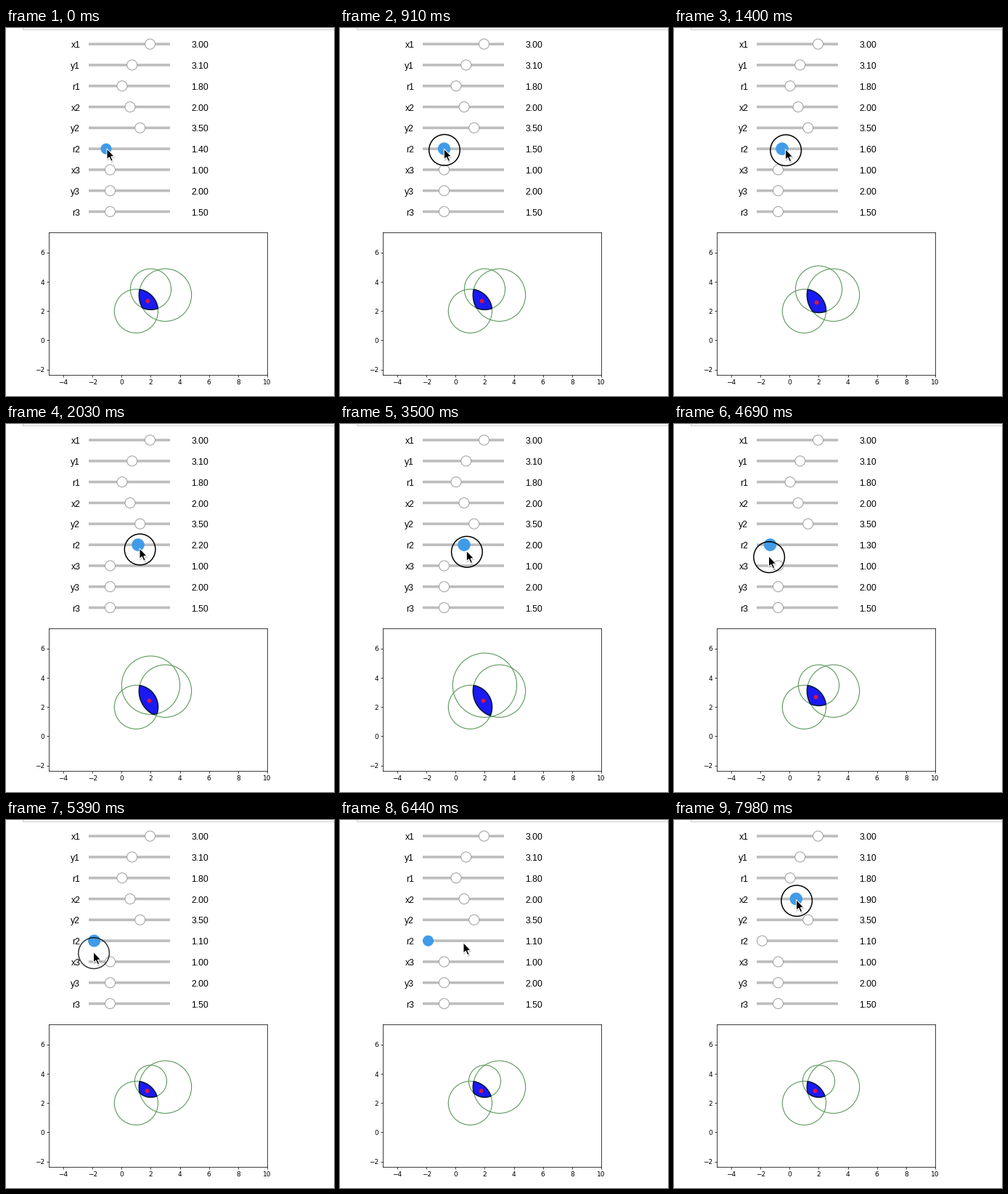
Recreate the animation shown at these times as a matplotlib script. Size 452 by 506 pixels, loop 8 s.

```python
import numpy as np
import matplotlib.pyplot as plt
from matplotlib.animation import FuncAnimation
from matplotlib.patches import Circle, Polygon

W, H, DPI = 452, 506, 64
PX = 72 / DPI                      # points per pixel
FRAMES, INTERVAL, STEP = 200, 40, 70
BLUE, GREY, RIM = "#409be8", "#bdbdbd", "#9e9e9e"

# discs as x, y, r
DISCS = np.array([(3, 3.1, 1.8), (2, 3.5, 1.4), (1, 2, 1.5)])
LOW, SPAN = dict(x=0, y=1, r=1), dict(x=4, y=4, r=2)
KNOB_X0, KNOB_TRAVEL = 116, 110

# pointer moves: start, end, target x, target y
HOME = (139, 166)
MOVES = [(700, 1400, 153.5, 166.5), (1400, 2040, 184.5, 171),
         (3080, 3400, 174.3, 174.2), (3500, 4690, 130.5, 181.5),
         (4690, 5000, 120.5, 181.5), (5880, 6230, 170, 168.5),
         (6440, 7000, 169, 130), (7140, 7420, 173, 109.5),
         (7600, 7980, 168.5, 109.5)]
RELEASE, GRAB = 5320, 7490         # r2 let go, x2 taken
ARROW = np.array([(0, 0), (0, 14.6), (3.3, 11.6), (5.8, 17.2), (8.2, 16.2),
                  (5.8, 10.8), (10.2, 10.6)])


def pointer(t):
    p = np.array(HOME, float)
    for start, end, x, y in MOVES:
        p += ((x, y) - p) * np.clip((t - start) / (end - start), 0, 1)
    return p


def knob_x(kind, value):
    return KNOB_X0 + KNOB_TRAVEL * (value - LOW[kind]) / SPAN[kind]


def dragged(kind, t):
    """Value under the pointer, in steps of 0.1."""
    part = (pointer(t)[0] - 1 - KNOB_X0) / KNOB_TRAVEL
    return round(LOW[kind] + SPAN[kind] * part, 1)


def second_disc(t):
    x = dragged("x", max(t, GRAB))
    r = dragged("r", min(t, RELEASE))
    return x, DISCS[1][1], r


def overlap(discs, n=240):
    """Outline of the common area of all discs, seen from a point inside."""
    p = np.array([1.9, 2.7])
    a = np.linspace(0, 2 * np.pi, n, endpoint=False)
    u = np.column_stack([np.cos(a), np.sin(a)])
    reach = []
    for x, y, r in discs:
        d = p - (x, y)
        b = u @ d
        reach.append(-b + np.sqrt(b * b - d @ d + r * r))
    return p + u * np.min(reach, axis=0)[:, None]


def centroid(pts):
    x, y = pts.T
    xn, yn = np.roll(x, -1), np.roll(y, -1)
    cross = x * yn - xn * y
    return np.array([((x + xn) * cross).sum(),
                     ((y + yn) * cross).sum()]) / (3 * cross.sum())


fig = plt.figure(figsize=(W / DPI, H / DPI), dpi=DPI, facecolor="white")
ui = fig.add_axes([0, 0, 1, 1])
ui.set(xlim=(0, W), ylim=(H, 0))
ui.axis("off")

# panel edge and sliders
ui.plot([23, 23, W], [0, 2, 2], color="#cccccc", lw=PX)
font = dict(family="Liberation Sans", size=12.3 * PX, color="black")
knobs, values = {}, {}
for i, value in enumerate(DISCS.flat):
    kind, name = "xyr"[i % 3], f"{'xyr'[i % 3]}{i // 3 + 1}"
    y = 22.1 + 28.8 * i
    ui.plot([114, 226], [y, y], color=GREY, lw=3.6 * PX,
            solid_capstyle="butt", snap=False)
    ui.text(102.3, y + 5, name, ha="right", **font)
    values[name] = ui.text(255.6, y + 5, f"{value:.2f}", **font)
    knobs[name] = ui.add_patch(Circle((knob_x(kind, value), y), 7,
                                      fc="white", ec=RIM, lw=PX, zorder=3))

ring = ui.add_patch(Circle((0, 0), 21.3, fill=False, ec="black",
                           lw=1.5 * PX, zorder=5))
shadow = ui.add_patch(Polygon(ARROW, fc="black", ec="black", lw=PX,
                              alpha=0.12, zorder=6))
arrow = ui.add_patch(Polygon(ARROW, fc="black", ec="white", lw=PX, zorder=7))

# plot
left, right, top, bottom, unit, base = 59, 360, 281, 477, 20.07, 429.4
ax = fig.add_axes([left / W, 1 - bottom / H, (right - left) / W,
                   (bottom - top) / H])
ax.set(xlim=(-5, 10), ylim=((base - bottom) / unit, (base - top) / unit),
       xticks=range(-4, 11, 2), yticks=range(-2, 7, 2))
ax.tick_params(labelsize=9 * PX, length=3.15 * PX, width=0.75 * PX,
               pad=3.15 * PX)
for label in ax.get_xticklabels() + ax.get_yticklabels():
    label.set_family("DejaVu Sans")
for spine in ax.spines.values():
    spine.set_linewidth(0.75 * PX)

circles = [ax.add_patch(Circle((x, y), r, fill=False, ec="#5a985a",
                               lw=1.1 * PX)) for x, y, r in DISCS]
lens = ax.add_patch(Polygon(overlap(DISCS), fc="#1a1af5", ec="#0b1c48",
                            lw=1.7 * PX, zorder=3))
dot, = ax.plot([], [], "o", color="#d41840", ms=6 * PX, mew=0, zorder=4)


def update(i):
    t = (i * INTERVAL + INTERVAL - 1) // STEP * STEP
    tip = pointer(t)
    arrow.set_xy(ARROW + tip)
    shadow.set_xy(ARROW + tip + (0.6, 1.8))

    press = np.interp(t, [350, 630, RELEASE, RELEASE + 350, GRAB, GRAB + 210],
                      [0, 1, 1, 0, 0, 1])
    ring.center = tip + (0.6, 1.6)
    ring.set_alpha(press)

    x2, _, r2 = second_disc(t - STEP)
    active = "x2" if t >= GRAB else "r2"
    for name, value in (("x2", x2), ("r2", r2)):
        on, knob = name == active, knobs[name]
        knob.center = (knob_x(name[0], value), knob.center[1])
        knob.set(fc=BLUE if on else "white", ec=BLUE if on else RIM,
                 radius=7 + (1.2 * press if on else 0))
        values[name].set_text(f"{value:.2f}")

    # the plot follows the sliders with a delay
    x, y, r = second_disc(t - 300)
    circles[1].set(center=(x, y), radius=r)
    area = overlap([DISCS[0], (x, y, r), DISCS[2]])
    lens.set_xy(area)
    cx, cy = centroid(area)
    dot.set_data([cx], [cy])
    return arrow, shadow, ring, lens, dot


anim = FuncAnimation(fig, update, frames=FRAMES, interval=INTERVAL,
                     repeat=True, repeat_delay=0)
plt.show()
```
